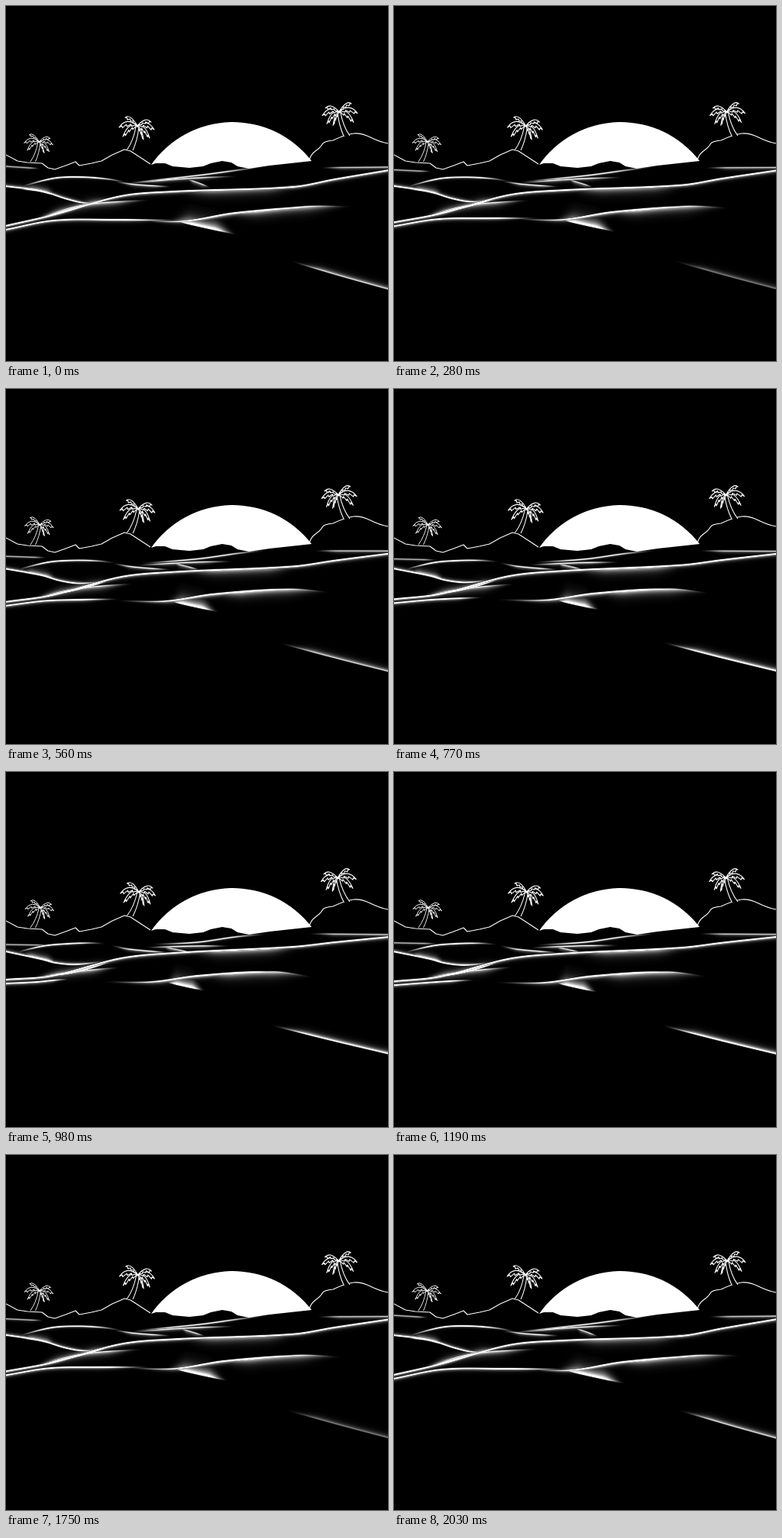
Animation of 500x465 px, one loop 2.1 s. Source, as an HTML page with a canvas:

```html
<!DOCTYPE html>
<html lang="en">
<head>
<meta charset="utf-8">
<title>Sunset over the sea</title>
<style>
html, body { margin: 0; width: 100%; height: 100%; overflow: hidden; background: #000; }
canvas { display: block; }
</style>
</head>
<body>
<canvas id="stage" width="500" height="465"></canvas>
<script>
const ctx = document.getElementById('stage').getContext('2d');
const STEP = 70, LAST = 14;          // the sea rolls for 14 steps, then back
const TOP = 195, W = 500, H = 185;   // the part of the stage with water
const sea = ctx.createImageData(W, H);

const lerp = (a, b, u) => a + (b - a) * u;
const ease = u => { u = Math.max(0, Math.min(1, u)); return u * u * (3 - 2 * u); };
const points = s => s.split(' ').map(p => p.split(',').map(Number));

// A crest goes from one curve to another; glow spreads down (or up if negative).
const crest = (glow, light, from, to) => ({ glow, light, from: points(from), to: points(to) });

const crests = [
  // far water
  crest(1, 1, '150,233 250,222 310,214 345,209', '188,226 250,223 300,216 345,212'),
  crest(1.5, .8, '410,212 501,211', '395,212 501,213'),
  crest(1.5, 1, '150,233 235,226 304,223', '180,230 245,228 294,228'),
  crest(2, .9, '234,226 252,232 267,238', '200,228 225,233 245,237'),
  crest(1.5, 1, '140,230 170,234 217,237', '136,227 160,232 216,237'),
  crest(1, .7, '-1,210 45,213', '-1,226 60,227'),
  // ridge and hollow on the left
  crest(1, 1.2, '8,240 60,226 95,224 135,227 165,233', '6,238 48,228 80,225 110,224 132,225'),
  crest(-1.5, 1.3, '-1,236 45,242 80,253 104,258 135,256', '-1,235 45,245 65,250 92,252 135,247'),
  crest(-3, 1.3, '14,239 42,242 72,250', '14,238 42,244 72,251'),
  // main crest with its reflections
  crest(1.5, 1.4, '-1,288 60,274 150,249 220,243 375,237 430,227 501,215',
    '-1,272 60,267 150,244 220,237 375,229 430,223 501,216'),
  crest(-3, 1.3, '30,281 90,265 150,249', '30,270 90,262 150,244'),
  crest(3, 1, '30,281 100,261 190,254', '30,270 95,261 150,256'),
  crest(4, .8, '200,244 340,239 410,232', '220,237 330,233 405,227'),
  // near swells
  crest(1.5, 1.3, '-1,293 62,281 140,280 235,281', '-1,277 40,275 60,273 85,271'),
  crest(2, 1.4, '160,280 230,282 300,271 400,263 452,263', '125,275 190,275 250,267 340,262 400,269'),
  crest(4, 1, '270,276 390,263 454,263', '240,268 350,262 402,269'),
  crest(-6, 1.4, '212,279 256,289 302,299', '206,274 232,280 260,286')
];
const streak = crest(-2.5, 1, '372,334 440,354 501,371', '345,331 425,351 501,369');

const sun = new Path2D('M190 208A130 130 0 0 1 400 203L345 209 318 213 303 210 295 205' +
  ' 283 203 268 206 258 210 240 212 218 210 208 206 196 206z');
const hills = new Path2D('M0 195L15 203 28 205 47 206 55 212 64 214 78 209 91 204 96 209 112 206' +
  ' 125 203 139 195 155 188 163 190 189 207' +
  'M397 203Q398 195 405 190T414 181 428 176Q445 168 455 167T477 172 500 180');

// One lighted column of water: a crisp line and haze on one side.
function column(x, y, glow, light) {
  const reach = Math.abs(glow) * 4 + 3;
  for (let py = Math.floor(y - reach); py <= y + reach; py++) {
    if (py < TOP || py >= TOP + H) continue;
    const d = py + .5 - y;
    const haze = d * glow > 0 ? .9 * Math.exp(-d / glow) : 0;
    const v = 255 * light * Math.max(Math.exp(-d * d / 1.1), haze);
    const i = ((py - TOP) * W + x) * 4;
    sea.data.fill(Math.max(sea.data[i], Math.min(255, v)), i, i + 3);
  }
}

function drawCrest({ glow, light, from, to }, t) {
  const p = from.map(([x, y], i) => ({ x: lerp(x, to[i][0], t), y: lerp(y, to[i][1], t) }));
  const slope = (a, b) => (b.y - a.y) / (b.x - a.x);
  const left = p[0].x, right = p[p.length - 1].x, fadeLength = (right - left) * .35;
  for (let i = 0; i < p.length - 1; i++) {
    const a = p[i], b = p[i + 1], dx = b.x - a.x;
    const ma = slope(p[i - 1] || a, b), mb = slope(a, p[i + 2] || b);
    for (let x = Math.max(0, Math.ceil(a.x)); x < Math.min(W, b.x); x++) {
      const u = (x - a.x) / dx, v = 1 - u;
      const y = lerp(a.y, b.y, ease(u)) + dx * u * v * (ma * v - mb * u);
      // crests that run off the stage do not fade there
      const fade = (left < 0 ? 1 : ease((x - left) / fadeLength)) *
        (right > W ? 1 : ease((right - x) / fadeLength));
      column(x, y, glow * (.3 + .7 * fade), light * fade);
    }
  }
}

// A leaf: arched back, and a toothed lower edge that returns to the crown.
function drawLeaf(tx, ty) {
  const len = Math.hypot(tx, ty), teeth = 4;
  const arch = (u, rise) => [tx * u, ty * u - 4 * u * (1 - u) * rise];
  ctx.beginPath();
  ctx.moveTo(0, 0);
  ctx.quadraticCurveTo(tx * .6, ty * .5 - len * .55, tx, ty);
  for (let i = teeth - 1; i >= 0; i--) {
    const u = i / teeth, [x, y] = arch(u + .1, len * .13);
    ctx.lineTo(x, y);
    if (i) ctx.lineTo(x - tx * .03, y + 2.5);
  }
  ctx.closePath();
  ctx.fill();
  ctx.stroke();
}

function drawPalm(x, y, sx, sy, sway) {
  ctx.save();
  ctx.translate(x, y);
  ctx.transform(sx, 0, -sway / 32 * sx, sy, 0, 0);
  ctx.beginPath();
  ctx.moveTo(-5, 0);
  ctx.quadraticCurveTo(4, -13, 7, -31);
  ctx.lineTo(11, -31);
  ctx.quadraticCurveTo(9, -13, 3, 0);
  ctx.fill();
  ctx.stroke();
  ctx.translate(9, -32);
  for (const [tx, ty] of [[8, 18], [-19, 14], [16, 16], [-24, 2], [22, 5], [18, -5], [-16, -11]])
    drawLeaf(tx, ty);
  ctx.restore();
}

function draw(t) {
  for (let i = 0; i < sea.data.length; i++) sea.data[i] = i % 4 === 3 ? 255 : 0;
  for (const c of crests) drawCrest(c, t);
  drawCrest({ ...streak, light: .9 - .4 * Math.sin(5.4 * t) }, t);

  ctx.fillStyle = '#000';
  ctx.fillRect(0, 0, 500, 465);
  ctx.putImageData(sea, 0, TOP);
  ctx.fillStyle = '#fff';
  ctx.fill(sun);
  ctx.strokeStyle = '#fff';
  ctx.lineWidth = 1.1;
  ctx.lineJoin = 'round';
  ctx.stroke(hills);
  ctx.fillStyle = '#000';
  drawPalm(36, 204, .82, .82, 1.8 * t);
  drawPalm(163, 189, 1, 1, 1.8 * t);
  drawPalm(445, 170, -1, .98, 1.8 * t);
}

const start = performance.now();
let shown = -1;
function tick() {
  const n = Math.floor((performance.now() - start) / STEP) % (2 * LAST + 2);
  const k = Math.min(n, 2 * LAST + 1 - n);
  if (k !== shown) draw((shown = k) / LAST);
  requestAnimationFrame(tick);
}
tick();
</script>
</body>
</html>
```
